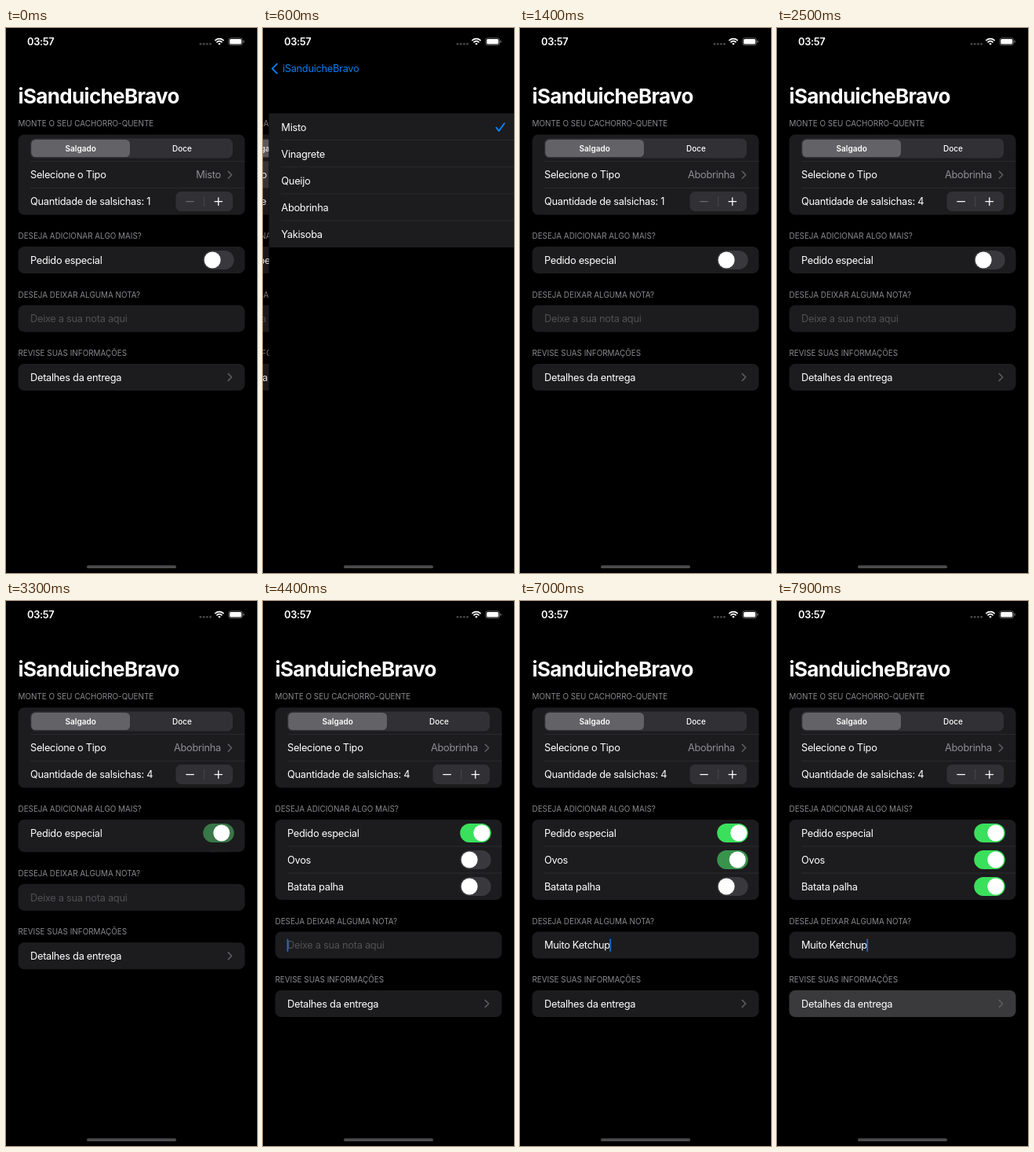
An HTML page for the animation above (8000 ms loop, 320 by 693 pixels).

```html
<!DOCTYPE html>
<html lang="pt-BR">
<head>
<meta charset="utf-8">
<title>iSanduicheBravo</title>
<style>
html, body { margin: 0; height: 100%; background: #000; overflow: hidden; }
svg { display: block; width: 100vw; height: 100vh; }
text { font: 400 12.8px Inter, "Liberation Sans", sans-serif; letter-spacing: -.022em; fill: #fff; white-space: pre; }
.title { font-size: 26px; font-weight: 700; letter-spacing: -.025em; }
.clock { font-weight: 600; }
.head { font-size: 9.9px; letter-spacing: 0; fill: #8a8a90; }
.seg { font-size: 10px; font-weight: 500; letter-spacing: 0; text-anchor: middle; }
.on { font-weight: 600; }
.value { fill: #8e8e94; text-anchor: end; }
.hint { fill: #515155; }
.blue { fill: #0a84ff; }
path { fill: none; stroke-linecap: round; stroke-linejoin: round; }
</style>
</head>
<body>
<svg id="stage" viewBox="0 0 320 693"></svg>
<script>
const LOOP = 8000;
const APP = 'iSanduicheBravo';
const KINDS = ['Misto', 'Vinagrete', 'Queijo', 'Abobrinha', 'Yakisoba'];
const NOTE = 'Muito Ketchup';
const PRESSES = [2090, 2240, 2390];
const CARD = '#1c1c1e', LIT = '#3a3a3c', FILL = '#313135', BLUE = '#0a84ff';
const stage = document.getElementById('stage');

const clamp = v => Math.min(1, Math.max(0, v));
const span = (t, start, length) => clamp((t - start) / length);
const easeOut = x => 1 - (1 - x) ** 3;
const easeInOut = x => x * x * (3 - 2 * x);

const text = (x, y, s, cls = '', attrs = '') => `<text x="${x}" y="${y}" class="${cls}" ${attrs}>${s}</text>`;
const rect = (x, y, w, h, fill, r = 0, attrs = '') =>
  `<rect x="${x}" y="${y}" width="${w}" height="${h}" rx="${r}" fill="${fill}" ${attrs}/>`;
const line = (d, color, width, attrs = '') => `<path d="${d}" stroke="${color}" stroke-width="${width}" ${attrs}/>`;
const group = (attrs, ...parts) => `<g ${attrs}>${parts.join('')}</g>`;
const card = (y, h, fill = CARD) => rect(15.5, y, 289, h, fill, 7.7);
const rule = (x, y, end) => rect(x, y - .4, end - x, .8, '#2d2d30');
const chevron = y => line(`M283.3 ${y - 4.4}l4.4 4.4l-4.4 4.4`, '#5c5c61', 1.6);

function toggle(y, t, start) {
  const x = span(t, start, 280);
  return rect(251.3, y - 12, 39.4, 24, '#39393d', 12) +
    rect(251.3, y - 12, 39.4, 24, '#3ae05b', 12, `opacity="${x}"`) +
    `<circle cx="${263.2 + 15.6 * easeOut(x)}" cy="${y}" r="10.5" fill="#fff"/>`;
}

function statusBar() {
  const dots = [248, 252.2, 256.4, 260.6].map(x => `<circle cx="${x}" cy="20.3" r="1.4" fill="#4a4a4c"/>`);
  return text(27, 22, '03:57', 'clock') + dots.join('') +
    line('M266.9 15.6a7.4 7.4 0 0 1 10.2 0M269 17.9a4.4 4.4 0 0 1 6 0', '#fff', 1.7) +
    '<path d="M270.3 19.9a2.5 2.5 0 0 1 3.4 0L272 21.8z" style="fill:#fff"/>' +
    rect(283.8, 12.8, 17.8, 9, 'none', 2.8, 'stroke="#77777a" stroke-width=".8"') +
    rect(285.1, 14.1, 15.2, 6.4, '#fff', 1.6) +
    rect(302.5, 15.8, 1.1, 3, '#77777a', .5);
}

function orderCard(t, push) {
  const count = 1 + PRESSES.filter(p => t >= p).length;
  const pressed = PRESSES.some(p => t >= p && t < p + 80);
  const rowLit = t >= 290 && t < 1400 ? (t < 980 ? 1 : push) : 0;
  return text(15.5, 125.4, 'MONTE O SEU CACHORRO-QUENTE', 'head') +
    card(135.5, 102) +
    rect(15.5, 169.5, 289, 34, LIT, 0, `opacity="${rowLit}"`) +
    rule(31, 169.5, 304.5) + rule(31, 203.5, 304.5) +
    rect(31, 140.5, 258, 25, FILL, 6.5) +
    rect(32.3, 141.9, 125.7, 22.2, '#636367', 5.5) +
    text(95.2, 156.6, 'Salgado', 'seg on') + text(224.5, 156.6, 'Doce', 'seg') +
    text(31, 191.2, 'Selecione o Tipo') +
    text(274, 191.2, t < 900 ? KINDS[0] : KINDS[3], 'value') + chevron(186.8) +
    text(31, 225.2, 'Quantidade de salsichas: ' + count) +
    rect(216.5, 208, 72.6, 25, FILL, 6.5) +
    (pressed ? rect(253, 208, 36.1, 25, '#4c4c50', 6.5) : '') +
    rect(252.3, 214, .9, 13, '#4a4a4e') +
    line('M229.8 220.6h9.6', count > 1 ? '#fff' : '#68686c', 1.3) +
    line('M266 220.6h9.6M270.8 215.8v9.6', '#fff', 1.3);
}

function extrasCard(t, open) {
  const h = 34 + 68 * open;
  return text(15.5, 268.2, 'DESEJA ADICIONAR ALGO MAIS?', 'head') + card(278, h) +
    `<clipPath id="extras">${rect(15.5, 278, 289, h, '#fff', 7.7)}</clipPath>` +
    group('clip-path="url(#extras)"',
      text(31, 299.6, 'Pedido especial'), toggle(295, t, 3199),
      group(`opacity="${open}"`,
        rule(31, 312, 304.5), text(31, 333.6, 'Ovos'), toggle(329, t, 6850),
        rule(31, 346, 304.5), text(31, 367.6, 'Batata palha'), toggle(363, t, 7400)));
}

function lowerCards(t, open) {
  const typed = t < 4754 ? '' : NOTE.slice(0, 1 + Math.floor((t - 4754) / 112));
  const blinkOn = t < 6100 || (t - 5880) % 1000 < 570;
  return group(`transform="translate(0 ${68 * open})"`,
    text(15.5, 342.6, 'DESEJA DEIXAR ALGUMA NOTA?', 'head'), card(352.5, 34),
    typed ? '' : text(31, 374.3, 'Deixe a sua nota aqui', 'hint'),
    text(31, 374.3, typed, '', 'id="note"'),
    t >= 4400 && blinkOn ? rect(30.5, 361.5, 1.8, 16.5, '#1a6ad2', .9, 'id="caret"') : '',
    text(15.5, 417, 'REVISE SUAS INFORMAÇÕES', 'head'),
    card(427, 34, t >= 7850 ? LIT : CARD),
    text(31, 448.6, 'Detalhes da entrega'), chevron(444));
}

function kindList(t, push) {
  const picked = t < 900 ? 0 : 3;
  const rows = KINDS.map((kind, i) => {
    const y = 108.5 + 34.1 * i;
    return (i == 3 && t >= 840 ? rect(0, y, 320, 34.1, LIT) : '') +
      (i ? rule(15.5, y, 320) : '') +
      text(15.8, y + 22, kind) +
      (i == picked ? line(`M289.8 ${y + 18.2}l3.4 4.2l7-9.6`, BLUE, 1.9) : '');
  });
  return group(`transform="translate(${320 * (1 - push)} 0)"`,
    rect(0, 0, 320, 693, '#000'), rect(0, 108.5, 320, 170.5, CARD), ...rows);
}

// The large title shrinks into the back button while the list slides in.
function navBar(push) {
  const shown = clamp(push * 2 - 1);
  return text(0, 0, APP, 'title',
      `transform="translate(${15.5 + 8.5 * push} ${96 - 40 * push}) scale(${1 - .5 * push})" opacity="${clamp(1 - push * 1.8)}"`) +
    group(`opacity="${shown}"`,
      line('M17.8 45.6l-6 6l6 6', BLUE, 2),
      text(24 + 40 * (1 - push), 56, APP, 'blue'));
}

function draw(t) {
  const push = t < 980 ? easeOut(span(t, 330, 380)) : 1 - easeOut(span(t, 980, 420));
  const open = easeInOut(span(t, 3230, 350));
  stage.innerHTML =
    rect(0, 0, 320, 693, '#000') +
    group(`transform="translate(${-96 * push} 0)"`, orderCard(t, push), extrasCard(t, open), lowerCards(t, open)) +
    rect(0, 0, 320, 693, '#000', 0, `opacity="${.1 * push}"`) +
    (push > 0 ? kindList(t, push) : '') +
    navBar(push) + statusBar() +
    rect(103, 683.2, 114, 3.9, '#4b4b4d', 1.95);
  const caret = document.getElementById('caret');
  const width = document.getElementById('note').getComputedTextLength();
  if (caret) caret.setAttribute('x', 30.5 + width);
}

const begin = performance.now();
function frame() {
  draw((performance.now() - begin) % LOOP);
  requestAnimationFrame(frame);
}
frame();
</script>
</body>
</html>
```
